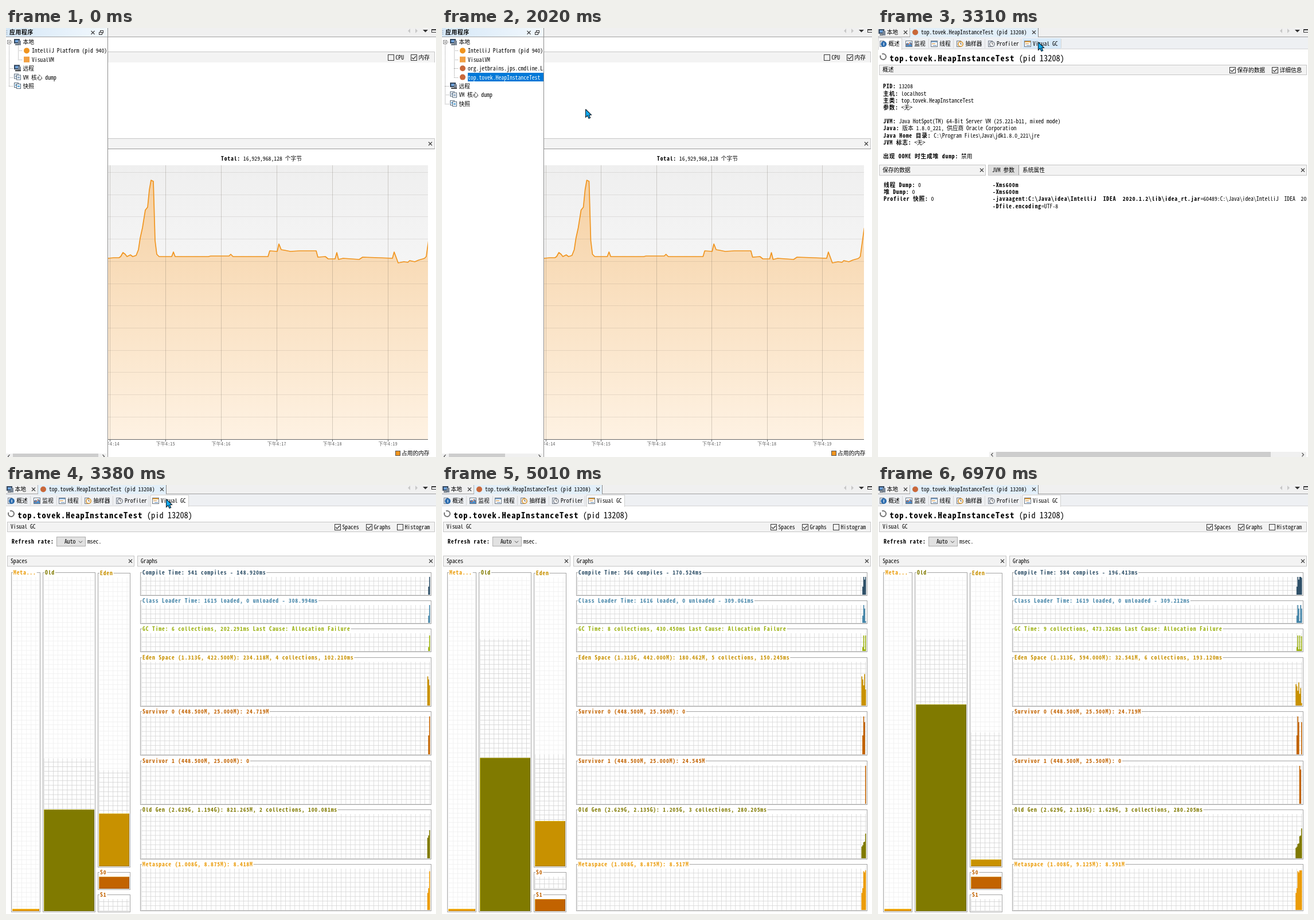
Write an HTML page with a canvas that moves like this. It is 750 by 747 pixels and loops after 8000 ms.

```html
<!DOCTYPE html>
<html lang="zh">
<head>
<meta charset="utf-8">
<title>Heap monitor</title>
<style>
html, body { margin: 0; width: 100%; height: 100%; overflow: hidden; background: #fff; }
canvas { display: block; }
</style>
</head>
<body>
<canvas id="stage" width="750" height="747"></canvas>
<script>
const g = document.getElementById('stage').getContext('2d');
const LOOP = 8000, EM = 9.72;
const FONT = '"Noto Sans Mono CJK SC", "Noto Sans CJK SC", "Noto Sans CJK", monospace';
const MAIN = 'top.tovek.HeapInstanceTest';
const ORANGE = '#f0941e', LINE = '#b4b4b4', BAR = '#f3f3f3';

// ---- basic drawing ----
function rect(x, y, w, h, color) {
  g.fillStyle = color;
  g.fillRect(x, y, w, h);
}
function frame(x, y, w, h, color) {
  g.strokeStyle = color;
  g.lineWidth = 1;
  g.strokeRect(x + .5, y + .5, w - 1, h - 1);
}
function path(points, color, width = 1) {
  g.beginPath();
  points.forEach(([x, y]) => g.lineTo(x, y));
  g.strokeStyle = color;
  g.lineWidth = width;
  g.stroke();
}
function poly(points, color) {
  g.beginPath();
  points.forEach(([x, y]) => g.lineTo(x, y));
  g.closePath();
  g.fillStyle = color;
  g.fill();
}
function dot(x, y, r, color) {
  g.beginPath();
  g.arc(x, y, r, 0, 7);
  g.fillStyle = color;
  g.fill();
}
function clipped(x, y, w, h, draw) {
  g.save();
  g.beginPath();
  g.rect(x, y, w, h);
  g.clip();
  draw();
  g.restore();
}
// y is the middle of the line; returns the right end
function text(s, x, y, { color = '#000', bold = false, size = EM } = {}) {
  g.font = `${bold ? 'bold ' : ''}${size}px ${FONT}`;
  g.letterSpacing = bold ? size * .083 + 'px' : '0px';
  g.fillStyle = color;
  g.fillText(s, x, y + size * .36);
  return x + g.measureText(s).width;
}
// "bold|plain|bold..."
function rich(s, x, y) {
  s.split('|').forEach((part, i) => { x = text(part, x, y, { bold: i % 2 === 0 }); });
}

// ---- widgets ----
function cross(x, y) {
  path([[x - 3, y - 3], [x + 3, y + 3]], '#444', 1.2);
  path([[x - 3, y + 3], [x + 3, y - 3]], '#444', 1.2);
}
function check(x, y, label, on) {
  frame(x, y, 11, 11, '#333');
  if (on) path([[x + 2, y + 5.5], [x + 4.5, y + 8], [x + 9, y + 3]], '#333', 1.2);
  text(label, x + 13.5, y + 6);
}
function bar(x, y, x2, y2, label, close) {
  rect(x, y, x2 - x, y2 - y, BAR);
  frame(x, y, x2 - x, y2 - y, '#c6c6c6');
  text(label, x + 6, (y + y2) / 2);
  if (close) cross(x2 - 7, (y + y2) / 2);
}
function arrow(x, y, dir) {
  path([[x - dir * 1.5, y - 3], [x + dir * 1.5, y], [x - dir * 1.5, y + 3]], '#555', 1.2);
}
function scrollbar(x, x2, y, from, to) {
  rect(x, y, x2 - x, 747 - y, '#f0f0f0');
  rect(from, y, to - from, 747 - y, '#cdcdcd');
  arrow(x + 5, y + 5, -1);
  arrow(x2 - 6, y + 5, 1);
}
function restore(x, y) {
  frame(x + 2, y, 6, 5, '#333');
  rect(x, y + 3, 6, 5, '#f4f8fc');
  frame(x, y + 3, 6, 5, '#333');
}
function topStrip(x) {
  rect(x, 0, 750 - x, 15, '#f0f0f0');
  rect(x, 15, 750 - x, 1, '#a0a0a0');
  poly([[705, 1], [705, 9], [701, 5]], '#c8c8c8');
  poly([[714, 1], [714, 9], [718, 5]], '#c8c8c8');
  poly([[727, 3], [736, 3], [731.5, 7.5]], '#333');
  frame(742, 2, 9, 6, '#333');
  rect(742, 2, 8, 2, '#333');
}
function monitor(x, y) {
  rect(x, y, 10, 8, '#33465c');
  rect(x + 2, y + 2, 6, 4, '#6fa3dc');
  rect(x + 7, y + 3, 5, 8, '#7b8796');
  rect(x + 2, y + 9, 6, 2, '#55606c');
}
function pages(x, y, tint) {
  for (const d of [0, 4]) {
    rect(x + d, y + d / 2, 8, 9, '#fff');
    frame(x + d, y + d / 2, 8, 9, '#56697c');
    rect(x + d + 2, y + d / 2 + 3, 4, 3, tint);
  }
}

// ---- application tree and memory chart ----
const memory = [178,401, 188,400, 197,400, 200,398, 204,391, 208,394, 211,398, 217,395, 221,398, 227,396,
  231,386, 234,366, 238,348, 243,317, 247,312, 250,282, 253,265, 257,267, 260,370, 263,394, 267,398,
  289,398, 292,390, 295,398, 353,398, 357,397, 389,397, 392,394, 396,398, 457,398, 460,388, 473,389,
  476,376, 480,386, 486,387, 496,389, 512,388, 541,388, 544,399, 557,398, 562,402, 574,402, 577,391,
  580,403, 588,401, 616,403, 622,399, 650,400, 674,401, 677,390, 684,409, 694,407, 701,408, 704,405,
  713,407, 720,404, 727,402, 730,401, 733,398, 740,348];

function chart(zoom) {
  const sx = x => 177 + (x - 177) * zoom;
  const line = [];
  for (let i = 0; i < memory.length; i += 2) line.push([sx(memory[i]), memory[i + 1]]);

  clipped(178, 239, 558, 478, () => {
    const back = g.createLinearGradient(0, 239, 0, 716);
    back.addColorStop(0, '#efefef');
    back.addColorStop(1, '#ffffff');
    rect(178, 239, 558, 478, back);
    const fill = g.createLinearGradient(0, 239, 0, 716);
    fill.addColorStop(0, '#f5cfa0');
    fill.addColorStop(1, '#fef2e3');
    poly([[178, 716], ...line, [745, 716]], fill);
    for (let i = 0; i < 12; i++) rect(178, Math.round(251 + i * 38.7), 558, 1, 'rgba(90,80,70,.13)');
    for (let i = 0; i < 6; i++) rect(Math.round(sx(181 + i * 97)), 239, 1, 477, 'rgba(90,80,70,.24)');
    g.lineJoin = 'round';
    path(line, ORANGE, 1.7);
  });
  rect(178, 716, 558, 1, '#666');
  for (let i = 0; i < 6; i++) {
    const x = sx(181 + i * 97);
    rect(Math.round(x), 716, 1, 4, '#666');
    text('下午4:1' + (4 + i), x - 16.5, 724.5, { size: 8.25, color: '#666' });
  }
}

function tree(grown, selected) {
  const rowY = i => 24 + 15.4 * i;
  const rows = [['本地', 0, (x, y) => monitor(x, y - 5)],
    ['IntelliJ Platform (pid 940)', 1, (x, y) => dot(x + 6, y, 5, ORANGE)],
    ['VisualVM', 1, (x, y) => rect(x + 1, y - 5, 10, 10, '#f2a043')]];
  const cup = (x, y) => dot(x + 6, y, 5, '#c9683a');
  if (grown) rows.push(['org.jetbrains.jps.cmdline.Launcher', 1, cup], [MAIN + ' (pid 13208)', 1, cup]);
  rows.push(['远程', 0, (x, y) => { monitor(x, y - 6); rect(x + 2, y + 3, 10, 2, '#444'); }],
    ['VM 核心 dump', 0, (x, y) => pages(x, y - 6, '#8fa9c4')],
    ['快照', 0, (x, y) => pages(x, y - 6, '#6fb0dc')]);

  g.setLineDash([1, 1]);
  path([[5.5, 28], [5.5, rowY(rows.length - 1)]], '#999');
  path([[21.5, 31], [21.5, rowY(grown ? 4 : 2)]], '#999');
  rows.forEach(([, level], i) => {
    const x = level ? 21 : 5, y = Math.round(rowY(i)) + .5;
    path([[x, y], [x + 8, y]], '#999');
  });
  g.setLineDash([]);
  rect(2, 21, 7, 7, '#fff');
  frame(2, 21, 7, 7, '#888');
  rect(4, 24, 3, 1, '#333');

  rows.forEach(([label, level, icon], i) => {
    const y = rowY(i), on = selected && i === 4;
    icon(level ? 30 : 14, y);
    if (on) rect(45, 78, 132, 15, '#0078d7');
    text(label, level ? 45 : 29.5, y + .5, { color: on ? '#fff' : '#000' });
  });
}

function applications(t) {
  const grown = t >= 690;
  topStrip(178);
  rect(178, 41, 570, 19, BAR);
  rect(178, 41, 570, 1, '#c6c6c6');
  rect(747, 41, 1, 19, '#c6c6c6');
  check(666, 46, 'CPU', false);
  check(706, 46, '内存', true);
  rect(178, 192, 570, 19, BAR);
  rect(178, 192, 570, 1, '#c6c6c6');
  rect(178, 210, 570, 1, '#999');
  rect(747, 192, 1, 18, '#c6c6c6');
  cross(740, 201.5);
  rich('Total:| 16,929,968,128 个字节', 375, 228);
  chart(t < 1100 ? 1 : .9938);
  rect(679, 736, 9, 9, '#555');
  rect(680, 737, 7, 7, ORANGE);
  text('占用的内存', 690, 741);

  clipped(0, 0, 177, 747, () => {
    rect(0, 0, 177, 747, '#fff');
    const head = g.createLinearGradient(0, 0, 177, 0);
    head.addColorStop(0, '#d5e7f7');
    head.addColorStop(1, '#f2f8fd');
    rect(0, 0, 177, 15, head);
    rect(0, 15, 177, 1, '#a0a0a0');
    for (const y of [4, 7, 10]) rect(1, y, 1, 1, '#777');
    text('应用程序', 6, 8, { bold: true });
    cross(151.5, 8);
    restore(162, 4);
    tree(grown, t >= 1400);
    scrollbar(0, 176, 741, 12, grown ? 110 : 161);
  });
  rect(177, 0, 1, 747, '#8c8c8c');
}

// ---- process window ----
const tabs = [[0, 42, '概述'], [45, 88, '监视'], [89, 131, '线程'], [134, 186, '抽样器'],
  [189, 249, 'Profiler'], [252, 319, 'Visual GC']];

function tabIcon(i, x) {
  if (i === 0 || i === 3 || i === 4) {
    rect(x, 22, 8, 11, '#e4e8ee');
    frame(x, 22, 8, 11, '#77808c');
    dot(x + 7, 28, 5, ['#2c6cae', , , '#d99a3a', '#8a8f98'][i]);
    dot(x + 7, 28, 3.3, i ? '#fff' : '#2c6cae');
    if (i) path([[x + 7, 25.5], [x + 7, 28], [x + 9, 28]], '#444');
    else rect(x + 6.5, 25.5, 1.2, 5, '#fff');
  } else {
    rect(x, 22, 12, 11, '#fff');
    frame(x, 22, 12, 11, '#6b7682');
    if (i === 1) {
      poly([[x + 1, 32], [x + 1, 28], [x + 4, 25], [x + 6, 29], [x + 9, 24], [x + 11, 27], [x + 11, 32]], '#4c8cc8');
      path([[x + 1, 27], [x + 4, 30], [x + 7, 25], [x + 11, 29]], '#d05a2a');
    } else {
      rect(x + 1, 23, 10, 2, i === 2 ? '#7da5cf' : '#e9a23a');
      rect(x + 2, 27, 6, 1, '#d08a30');
      rect(x + 4, 30, 6, 1, '#5a86b4');
    }
  }
}

function processTop(active, hover) {
  topStrip(0);
  monitor(1, 2);
  text('本地', 15.5, 8);
  cross(48, 7.5);
  rect(55, 0, 1, 15, LINE);
  rect(56, 0, 223, 16, '#e2eff9');
  rect(279, 0, 1, 16, '#888');
  dot(65, 7.5, 5, '#c9683a');
  text(MAIN + ' (pid 13208)', 75, 8);
  cross(272, 7.5);

  rect(0, 16, 750, 20, '#eef0f3');
  rect(0, 36, 750, 1, '#d4d4d4');
  tabs.forEach(([x, x2, label], i) => {
    if (i === active) {
      rect(x, 17, x2 - x, 20, '#fff');
      frame(x, 17, x2 - x, 21, '#d0d0d0');
      rect(x + 1, 36, x2 - x - 2, 2, '#fff');
    } else {
      if (i === hover) rect(x, 18, x2 - x, 18, '#d8eaf9');
      rect(x2, 19, 1, 16, '#d6d6d6');
    }
    tabIcon(i, x + 3);
    text(label, x + (i > 3 ? 18 : 18.3), 28);
  });

  g.beginPath();
  g.arc(9, 50, 5, -2, 3.6);
  g.strokeStyle = '#777';
  g.lineWidth = 2;
  g.stroke();
  const end = text(MAIN, 20.5, 53, { bold: true, size: 14.4 });
  text(' (pid 13208)', end, 53, { size: 14.4 });
  bar(2, 64, 748, 82, active ? 'Visual GC' : '概述');
}

function overview(hover) {
  processTop(0, hover);
  check(613, 68, '保存的数据', true);
  check(687, 68, '详细信息', true);
  const lines = ['PID:| 13208', '主机:| localhost', '主类:| ' + MAIN, '参数:| <无>', '',
    'JVM:| Java HotSpot(TM) 64-Bit Server VM (25.221-b11, mixed mode)',
    'Java:| 版本 1.8.0_221, 供应商 Oracle Corporation',
    'Java Home 目录:| C:\\Program Files\\Java\\jdk1.8.0_221\\jre',
    'JVM 标志:| <无>', '', '出现 OOME 时生成堆 dump:| 禁用'];
  lines.forEach((s, i) => rich(s, 9, 102 + i * 12.15));

  bar(2, 238, 188, 257, '保存的数据', true);
  bar(192, 238, 748, 257, '', true);
  rect(193, 239, 52, 17, '#e0e0e0');
  rect(245, 239, 1, 17, '#999');
  text('JVM 参数', 199, 248);
  text('系统属性', 252, 248);
  ['线程 Dump:| 0', '堆 Dump:| 0', 'Profiler 快照:| 0'].forEach((s, i) => rich(s, 10, 273.5 + i * 12.2));
  const idea = 'C:\\Java\\idea\\IntelliJ  IDEA  2020.1.2\\';
  clipped(192, 258, 556, 80, () => {
    ['-Xms600m', '-Xms600m', `-javaagent:${idea}lib\\idea_rt.jar|=60489:${idea}bin`, '-Dfile.encoding|=UTF-8']
      .forEach((s, i) => rich(s, 200, 273.5 + i * 12.2));
  });
  scrollbar(194, 747, 738, 206, 685);
}

// ---- Visual GC ----
const CELL = 8.1, SAMPLE = 1.62;

// title, colour, title y, bottom, bar height unit, samples
const graphs = [
  ['Compile Time: ', '#2f5068', 152, 193, 31, [0, .45, 1, .85, 1, 1, .95]],
  ['Class Loader Time: ', '#4585a8', 201, 242, 31, [0, .4, 1, .8, .1, 1, .8]],
  ['GC Time: ', '#9ab00c', 250, 291, 27, [0, .25, 1, .1, 1, .1, .95]],
  ['Eden Space ', '#c89100', 300, 386, 76, [.49, .44, .34, .53, .27, .4, .06]],
  ['Survivor 0 ', '#c26300', 394, 471, 66, [0, .5, 1, .85, 0, 0, .85]],
  ['Survivor 1 ', '#c26300', 480, 557, 66, [0, 0, 0, 0, 1, .9, 0]],
  ['Old Gen ', '#807a00', 565, 652, 52, [.35, .39, .48, .5, .74, .76, 1]],
  ['Metaspace ', '#eb9c0a', 660, 742, 69, [.43, .55, .98, .95, 1, 1, 1]]];

// n: samples so far; eden and old: top of the committed area, top of the bar
const states = [
  { t: 3380, n: 3, eden: [497, 572], old: [476, 565], live: 0, scale: [1.36, 1.96], info: [
    '541 compiles - 148.920ms', '1615 loaded, 0 unloaded - 308.994ms', '6 collections, 202.291ms',
    '(1.313G, 422.500M): 234.118M, 4 collections, 102.210ms', '(448.500M, 25.000M): 24.719M',
    '(448.500M, 25.000M): 0', '(2.629G, 1.194G): 821.265M, 2 collections, 100.081ms', '(1.008G, 8.875M): 8.418M'] },
  { t: 4000, n: 4, eden: [497, 525], info: { 0: '549 compiles - 156.276ms',
    3: '(1.313G, 422.500M): 353.752M, 4 collections, 102.210ms', 7: '(1.008G, 8.875M): 8.442M' } },
  { t: 5010, n: 5, eden: [469, 585], old: [268, 475], live: 1, scale: [1.36, 1.12], info: {
    0: '566 compiles - 170.524ms', 1: '1616 loaded, 0 unloaded - 309.061ms', 2: '8 collections, 430.450ms',
    3: '(1.313G, 442.000M): 180.462M, 5 collections, 150.245ms', 4: '(448.500M, 25.500M): 0',
    5: '(448.500M, 25.000M): 24.545M', 6: '(2.629G, 2.135G): 1.205G, 3 collections, 280.205ms',
    7: '(1.008G, 8.875M): 8.517M' } },
  { t: 6050, n: 6, eden: [469, 546], info: { 0: '579 compiles - 181.861ms', 1: '1618 loaded, 0 unloaded - 309.154ms',
    3: '(1.313G, 442.000M): 267.388M, 5 collections, 150.245ms', 7: '(1.008G, 8.875M): 8.556M' } },
  { t: 6970, n: 7, eden: [431, 652], old: [268, 382], live: 0, scale: [1, 1], info: {
    0: '584 compiles - 196.413ms', 1: '1619 loaded, 0 unloaded - 309.212ms', 2: '9 collections, 473.326ms',
    3: '(1.313G, 594.000M): 32.541M, 6 collections, 193.120ms', 4: '(448.500M, 25.500M): 24.719M',
    5: '(448.500M, 25.500M): 0', 6: '(2.629G, 2.135G): 1.629G, 3 collections, 280.205ms',
    7: '(1.008G, 9.125M): 8.591M' } }];

function stateAt(t) {
  return states.filter(s => s.t <= t)
    .reduce((a, s) => ({ ...a, ...s, info: { ...a.info, ...s.info } }), {});
}
function grid(x, y, x2, y2, color) {
  for (let gx = x; gx < x2; gx += CELL) rect(gx, y, .81, y2 - y, color);
  for (let gy = y2 - .81; gy >= y; gy -= CELL) rect(x, gy, x2 - x, .81, color);
}
function titled(x, y, x2, y2, title, color) {
  frame(x, y, x2 - x, y2 - y, '#a4a4a4');
  g.font = `bold ${EM}px ${FONT}`;
  g.letterSpacing = EM * .083 + 'px';
  rect(x + 3, y - 4, g.measureText(title).width + 2, 9, '#fff');
  text(title, x + 4, y + .5, { color, bold: true });
}
// bar with a raised edge
function raised(x, y, w, h, color) {
  rect(x, y, w, h, color);
  if (h < 2) return;
  const light = 'rgba(255,235,60,.4)', dark = 'rgba(0,0,0,.25)';
  rect(x, y, w, .81, light);
  rect(x, y, .81, h, light);
  rect(x, y + h - .81, w, .81, dark);
  rect(x + w - .81, y, .81, h, dark);
}
function space(x, y, x2, y2, title, color, committed, top) {
  const left = x + 2, right = x2 - 2, bottom = y2 - 2;
  titled(x, y, x2, y2, title, color);
  grid(left, y + 8, right, bottom, '#efefef');
  rect(left, committed, right - left, bottom - committed, '#fff');
  grid(left, committed, right, bottom, '#d2d2d2');
  raised(left, top, right - left, bottom - top, color);
}

function visualGC(t) {
  const s = stateAt(t);
  processTop(5);
  check(573, 68, 'Spaces', true);
  check(628, 68, 'Graphs', true);
  check(682, 68, 'Histogram', false);
  text('Refresh rate:', 10, 99, { bold: true });
  rect(88, 90, 51, 17, '#e1e1e1');
  frame(88, 90, 51, 17, '#adadad');
  text('Auto', 102, 99);
  path([[127, 97.5], [130, 100.5], [133, 97.5]], '#444');
  text('msec.', 142, 99);
  bar(2, 123, 224, 142, 'Spaces', true);
  bar(229, 123, 748, 142, 'Graphs', true);

  space(9, 152, 60, 744, 'Meta...', '#eb9c0a', 738, 738);
  space(64, 152, 156, 744, 'Old', '#807a00', ...s.old);
  space(160, 153, 217, 666, 'Eden', '#c89100', ...s.eden);
  space(160, 674, 217, 705, 'S0', '#c26300', 682, s.live === 0 ? 682 : 703);
  space(160, 713, 217, 744, 'S1', '#c26300', 721, s.live === 1 ? 721 : 742);

  graphs.forEach(([name, color, y, y2, unit, samples], i) => {
    const k = i === 3 ? s.scale[0] : i === 6 ? s.scale[1] : 1;
    titled(234, y, 742, y2, name + s.info[i] + (i === 2 ? ' Last Cause: Allocation Failure' : ''), color);
    grid(236, y + 8, 740, y2 - 1, '#d6d6d6');
    g.beginPath();
    for (let j = 0; j < s.n; j++) {
      const h = samples[j] * unit * k;
      g.rect(739.6 - SAMPLE * (s.n - j), y2 - 2 - h, SAMPLE, h);
    }
    g.fillStyle = color;
    g.fill();
  });
}

// ---- pointer: start, end, number of steps, destination ----
const moves = [[520, 850, 5, 150, 34], [1020, 1250, 4, 82, 82], [1950, 1950, 1, 140, 98], [2020, 2020, 1, 250, 141],
  [2110, 2110, 1, 287, 193], [2180, 2180, 1, 347, 273], [2420, 3150, 10, 268, 42], [3230, 3230, 1, 275, 32],
  [3310, 3310, 1, 279, 24], [3620, 4230, 9, 640, 800]];

function pointer(t) {
  let x = 720, y = 900;
  for (const [from, to, n, tx, ty] of moves) {
    if (t < from) break;
    const step = t >= to ? n : 1 + Math.floor((t - from) / (to - from) * (n - 1));
    x += (tx - x) * step / n;
    y += (ty - y) * step / n;
  }
  const shape = [[0, 0], [0, 14], [3.2, 11.2], [5.6, 16], [8.2, 14.8], [6, 10.2], [10, 9.8]]
    .map(([dx, dy]) => [x + .5 + dx, y + .5 + dy]);
  poly(shape, '#12a9ee');
  path([...shape, shape[0]], '#10202c', 1.1);
}

const start = performance.now();
function draw() {
  const t = (performance.now() - start) % LOOP;
  rect(0, 0, 750, 747, '#fff');
  if (t < 2110) applications(t);
  else if (t < 3380) overview(t >= 3230 ? 5 : -1);
  else visualGC(t);
  pointer(t);
  requestAnimationFrame(draw);
}
draw();
</script>
</body>
</html>
```
